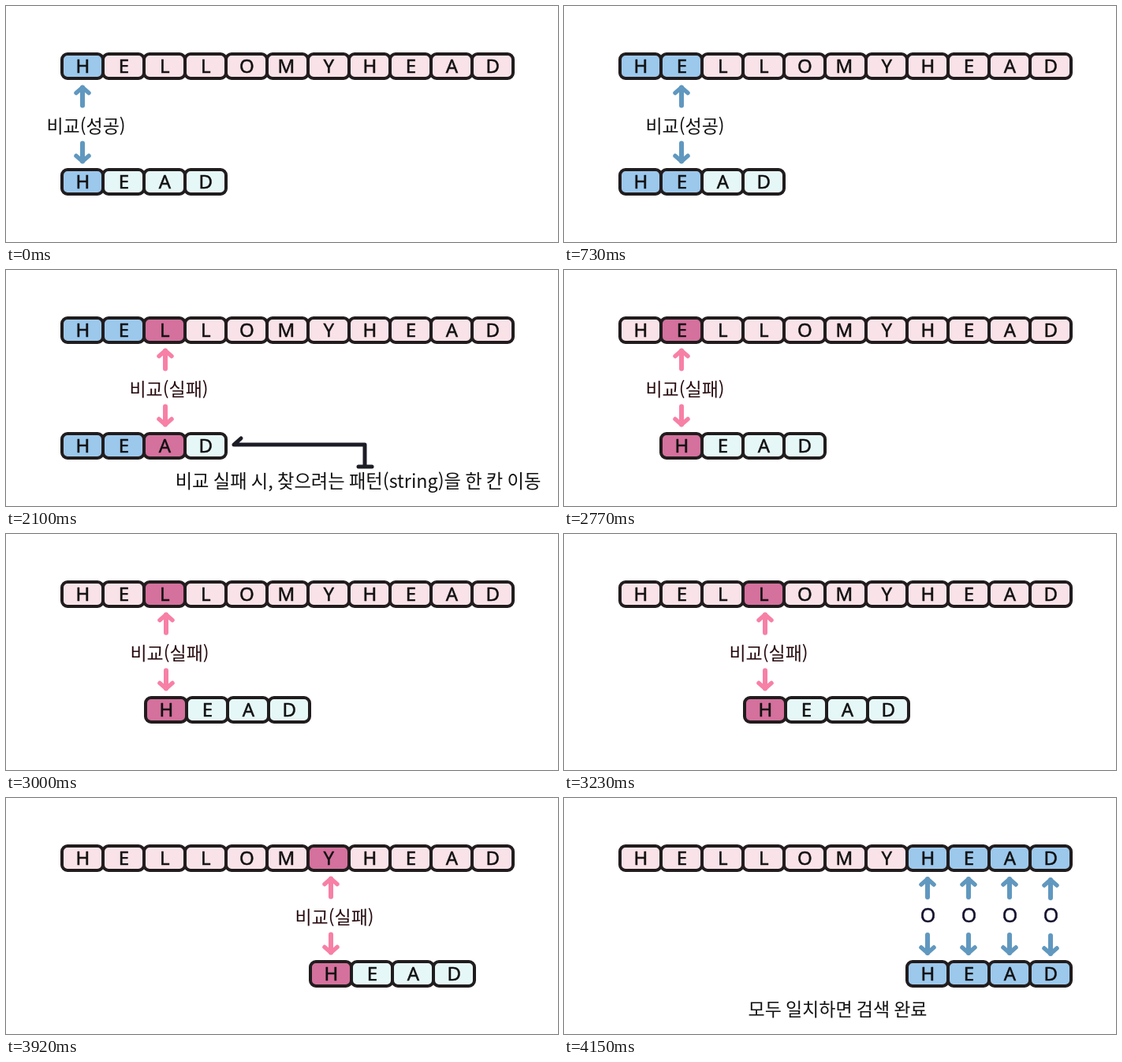
Write an HTML page with a canvas that moves like this. It is 700x300 px and loops after 4.85 s.

```html
<!DOCTYPE html>
<html lang="ko">
<head>
<meta charset="utf-8">
<style>
html, body { margin: 0; width: 100%; height: 100%; overflow: hidden; background: #fff; }
canvas { display: block; }
</style>
</head>
<body>
<canvas id="stage" width="700" height="300"></canvas>
<script>
const ctx = document.getElementById('stage').getContext('2d');
const LOOP = 4850, PITCH = 52, LEFT = 97;
const TEXT = 'HELLOMYHEAD', PATTERN = 'HEAD';
const INK = '#211c1d', PINK = '#f9e2e8', MINT = '#e6f7f7';
const HIT = '#9cc8ec', MISS = '#d4719d';
const HIT_ARROW = '#6098bf', MISS_ARROW = '#f780a6';
const KO = '"Noto Sans CJK KR", "Noto Sans CJK", sans-serif';
const LATIN = '"Noto Sans", sans-serif';

// at: start time, x: first pattern cell, hits/miss: highlighted text cells
const STEPS = [
  { at: 0, x: 97, from: 0, hits: 1 },
  { at: 730, x: 97, from: 0, hits: 2 },
  { at: 1430, x: 97, from: 0, hits: 2, miss: 2, arrow: 202 },
  { at: 2100, x: 97, from: 0, hits: 2, miss: 2, arrow: 202, note: true },
  { at: 2770, x: 149, from: 1, hits: 0, miss: 1 },
  { at: 3000, x: 203, from: 2, hits: 0, miss: 2 },
  { at: 3230, x: 255, from: 3, hits: 0, miss: 3 },
  { at: 3460, x: 305, from: 4, hits: 0, miss: 4 },
  { at: 3690, x: 357, from: 5, hits: 0, miss: 5 },
  { at: 3920, x: 412, from: 6, hits: 0, miss: 6 },
  { at: 4150, x: 461, from: 7, hits: 4, done: true }
];

function write(str, x, y, font, color, bold = 0) {
  ctx.font = font;
  ctx.textAlign = 'center';
  ctx.fillStyle = ctx.strokeStyle = color;
  ctx.fillText(str, x, y);
  if (bold) {
    ctx.lineWidth = bold;
    ctx.strokeText(str, x, y);
  }
}

function line(points, color, width) {
  ctx.beginPath();
  points.forEach(([x, y]) => ctx.lineTo(x, y));
  ctx.strokeStyle = color;
  ctx.lineWidth = width;
  ctx.lineCap = ctx.lineJoin = 'round';
  ctx.stroke();
}

function row(word, x, top, base, step) {
  [...word].forEach((ch, i) => {
    const cell = i + (word === PATTERN ? step.from : 0);
    const hit = cell >= step.from && cell < step.from + step.hits;
    const cx = x + i * PITCH;
    ctx.beginPath();
    ctx.roundRect(cx - 26, top, PITCH, 31, 7);
    ctx.fillStyle = cell === step.miss ? MISS : hit ? HIT : base;
    ctx.fill();
    ctx.strokeStyle = INK;
    ctx.lineWidth = 4;
    ctx.stroke();
    write(ch, cx + (ch === 'M' ? -1.5 : 0.3), top + 24, '24px ' + LATIN, '#111', 0.5);
  });
}

function arrow(x, tip, dir, color) {
  line([[x, tip + dir * 3], [x, tip + dir * 26]], color, 6);
  line([[x - 8, tip + dir * 10], [x, tip + dir * 3], [x + 8, tip + dir * 10]], color, 5.5);
}

function arrows(x, top, color) {
  arrow(x, top, 1, color);
  arrow(x, top + 100, -1, color);
}

function note() {
  line([[455, 249], [455, 222], [289, 222], [298, 214]], '#1d1d26', 5);
  line([[447, 250], [464, 250]], '#1d1d26', 5);
  write('비교 실패 시, 찾으려는 패턴(string)을 한 칸 이동', 446.5, 277,
    '500 23.3px ' + KO, '#111');
}

function draw(step) {
  ctx.fillStyle = '#fff';
  ctx.fillRect(0, 0, 700, 300);
  row(TEXT, LEFT, 61, PINK, step);
  row(PATTERN, step.x, 208, MINT, step);
  if (step.done) {
    for (let i = 0; i < 4; i++) {
      const x = step.x + i * PITCH;
      arrows(x, i === 3 ? 101 : 100, HIT_ARROW);
      write('O', x + 0.5, 158, '25px ' + LATIN, '#14122e', 0.5);
    }
    write('모두 일치하면 검색 완료', 347, 277, '500 23px ' + KO, '#111');
    return;
  }
  const fail = step.miss !== undefined;
  const x = step.arrow || (fail ? step.x : step.x + (step.hits - 1) * PITCH);
  arrows(x, fail ? 99.5 : 100.5, fail ? MISS_ARROW : HIT_ARROW);
  write(fail ? '비교(실패)' : '비교(성공)', x + 4.5, fail ? 159.5 : 160.5,
    '500 23px ' + KO, fail ? '#260a0e' : '#111');
  if (step.note) note();
}

function tick(now) {
  const t = now % LOOP;
  draw(STEPS.filter(s => s.at <= t).pop());
  requestAnimationFrame(tick);
}
requestAnimationFrame(tick);
</script>
</body>
</html>
```
